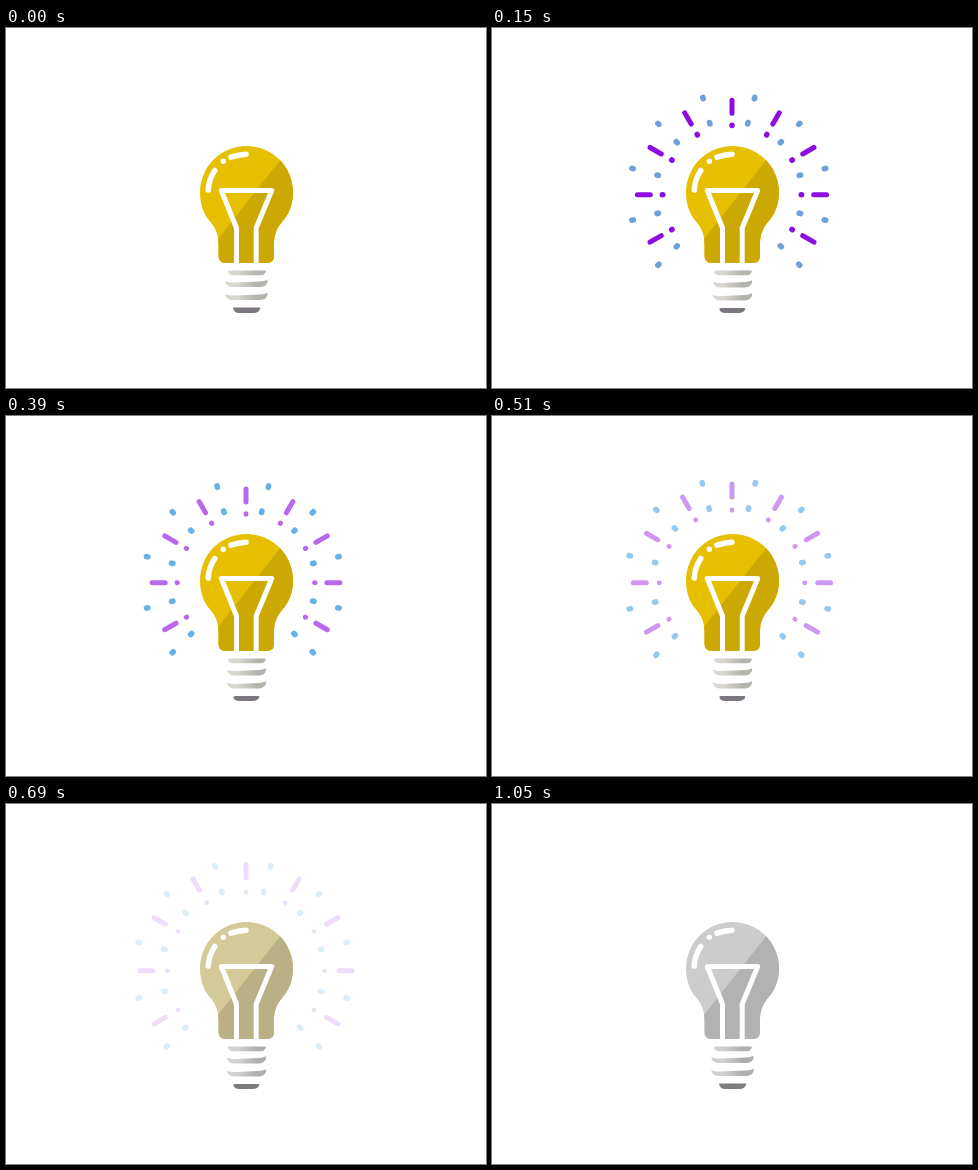
An HTML page that plays this animation: 480 by 360 pixels, repeating every 1.08 s.

```html
<!DOCTYPE html>
<html lang="en">
<head>
<meta charset="utf-8">
<title>Light bulb</title>
<style>
html, body { margin: 0; width: 100%; height: 100%; overflow: hidden; background: #fff; }
svg { display: block; width: 480px; height: 360px; }
.line { fill: none; stroke: #fff; stroke-linecap: round; stroke-linejoin: round; }
#rays { fill: none; stroke-linecap: round; }
</style>
</head>
<body>
<svg viewBox="0 0 480 360">
  <defs>
    <clipPath id="glass">
      <path d="M194 164.500A46.500 46.500 0 0 1 287 164.500C287 177 282.500 187 276 194C270 201 268 208 268 217V228Q268 235 261 235H219.500Q212.500 235 212.500 228V217C212.500 208 210.500 201 204.500 194C198 187 194 177 194 164.500Z"/>
    </clipPath>
    <linearGradient id="metal" gradientUnits="userSpaceOnUse" x1="222" y1="0" x2="260" y2="0">
      <stop id="metalLight" offset=".25"/>
      <stop id="metalDark" offset=".75"/>
    </linearGradient>
  </defs>
  <g id="rays">
    <path id="dots" stroke-width="5.600"/>
    <path id="dashes" stroke-width="5"/>
    <path id="tips"/>
  </g>
  <g clip-path="url(#glass)">
    <rect id="light" x="190" y="110" width="100" height="130"/>
    <path id="dark" d="M291.600 110L189 240H300V110Z"/>
    <path class="line" stroke-width="5" d="M230.500 240V200L215.300 162.500H265.700L250.200 200V240"/>
  </g>
  <path class="line" stroke-width="5.500" d="M202.200 162A38.500 38.500 0 0 1 208.800 142.500M217.300 133.200h.01M225 129.200Q232 126.600 240 126.200"/>
  <path id="rings" fill="url(#metal)"/>
  <path id="cap"/>
</svg>
<script>
const LOOP = 1080, STEP = 30, RAYS_ON = 30, RAYS_OFF = 780, TURN = 270;
const $ = id => document.getElementById(id);
const set = (id, name, value) => $(id).setAttribute(name, value);

const WHITE = [255, 255, 255], PURPLE = [136, 0, 222];
const BLUE = [0, 122, 216], DULL_BLUE = [104, 156, 214];

// How far t has come from a to b, held within 0 and 1
const progress = (t, a, b) => Math.min(1, Math.max(0, (t - a) / (b - a)));
const mix = (a, b, k) => a.map((v, i) => v + (b[i] - v) * k);
const rgb = c => `rgb(${c.map(Math.round)})`;

// Radial strokes every 30 degrees, symmetric about straight up
function fan(cx, cy, spread, from, to) {
  let d = '';
  for (let a = -spread; a <= spread; a += 30) {
    const s = Math.sin(a * Math.PI / 180), c = Math.cos(a * Math.PI / 180);
    const at = r => `${(cx + s * r).toFixed(2)} ${(cy - c * r).toFixed(2)}`;
    d += `M${at(from)}L${at(to)}`;
  }
  return d;
}

function drawRays(t) {
  // Pull in, then drift out while fading to white
  const reach = 91.4 + Math.abs(t - TURN) * (t < TURN ? .048 : .041);
  const grow = reach - 97;
  const far = 99.5 + grow * .7, near = 73.5 + grow * .65, tip = 69.3 + grow * .8;
  const fade = progress(t, 120, RAYS_OFF);
  const violet = rgb(mix(PURPLE, WHITE, fade));
  const blue = mix(DULL_BLUE, BLUE, progress(t, 150, TURN));
  const dots = r => fan(236.8, 166.3, 135, r - .7, r + .7);

  set('dots', 'd', dots(far) + dots(near));
  set('dots', 'stroke', rgb(mix(blue, WHITE, fade)));
  set('dashes', 'd', fan(240, 166.8, 120, reach - 15.5, reach - 2.5));
  set('dashes', 'stroke', violet);
  set('tips', 'd', fan(240, 166.8, 120, tip - .2, tip + .2));
  set('tips', 'stroke', violet);
  set('tips', 'stroke-width', 5.6 - 1.6 * fade);
}

function ring(y, half) {
  const l = 240.5 - half, r = 240.5 + half;
  return `M${l} ${y}Q${l + 3} ${y + 1.5} ${l + 9} ${y + 1.5}L${r - 8} ${y + .5}` +
    `Q${r - 2} ${y} ${r} ${y - 1.5}Q${r + .5} ${y + 5} ${r - 7} ${y + 6}` +
    `H${l + 8}Q${l + 1} ${y + 6} ${l} ${y}Z`;
}

// The screw base is slightly slimmer while the rays show
function drawBase(lit) {
  const half = lit ? 19.7 : 21.3, y = lit ? .5 : 0;
  const top = 'M222 243.5Q222 242.500 224 242.500H259Q260.500 242.500 259.500 244.500' +
    'Q258 247.300 255 247.300H227Q223 247.300 222 243.500Z';
  set('rings', 'd', top + ring(253 + y, half) + ring(266 + y, half));
  set('cap', 'd', lit
    ? 'M229 280H252Q254 280 253 282Q251 285 247 285H233Q229 285 227.500 282Q227 280 229 280Z'
    : 'M227 279.500H254.500Q253 285 247.500 285H233Q228 285 227 279.500Z');
}

function draw(t) {
  const lit = t >= RAYS_ON && t < RAYS_OFF;
  $('rays').style.display = lit ? '' : 'none';
  if (lit) drawRays(t);
  drawBase(lit);

  const dim = progress(t, 510, 750);
  const shade = (on, off) => rgb(mix(on, off, dim));
  set('light', 'fill', shade([230, 191, 0], [204, 204, 204]));
  set('dark', 'fill', shade([204, 168, 2], [178, 178, 178]));
  set('metalLight', 'stop-color', shade([216, 214, 205], [208, 208, 208]));
  set('metalDark', 'stop-color', shade([180, 179, 172], [174, 174, 174]));
  set('cap', 'fill', shade([124, 119, 126], [124, 124, 124]));
}

const start = performance.now();
function tick() {
  const t = Math.max(0, performance.now() - start) % LOOP;
  draw(Math.floor(t / STEP) * STEP);
  requestAnimationFrame(tick);
}
tick();
</script>
</body>
</html>
```
